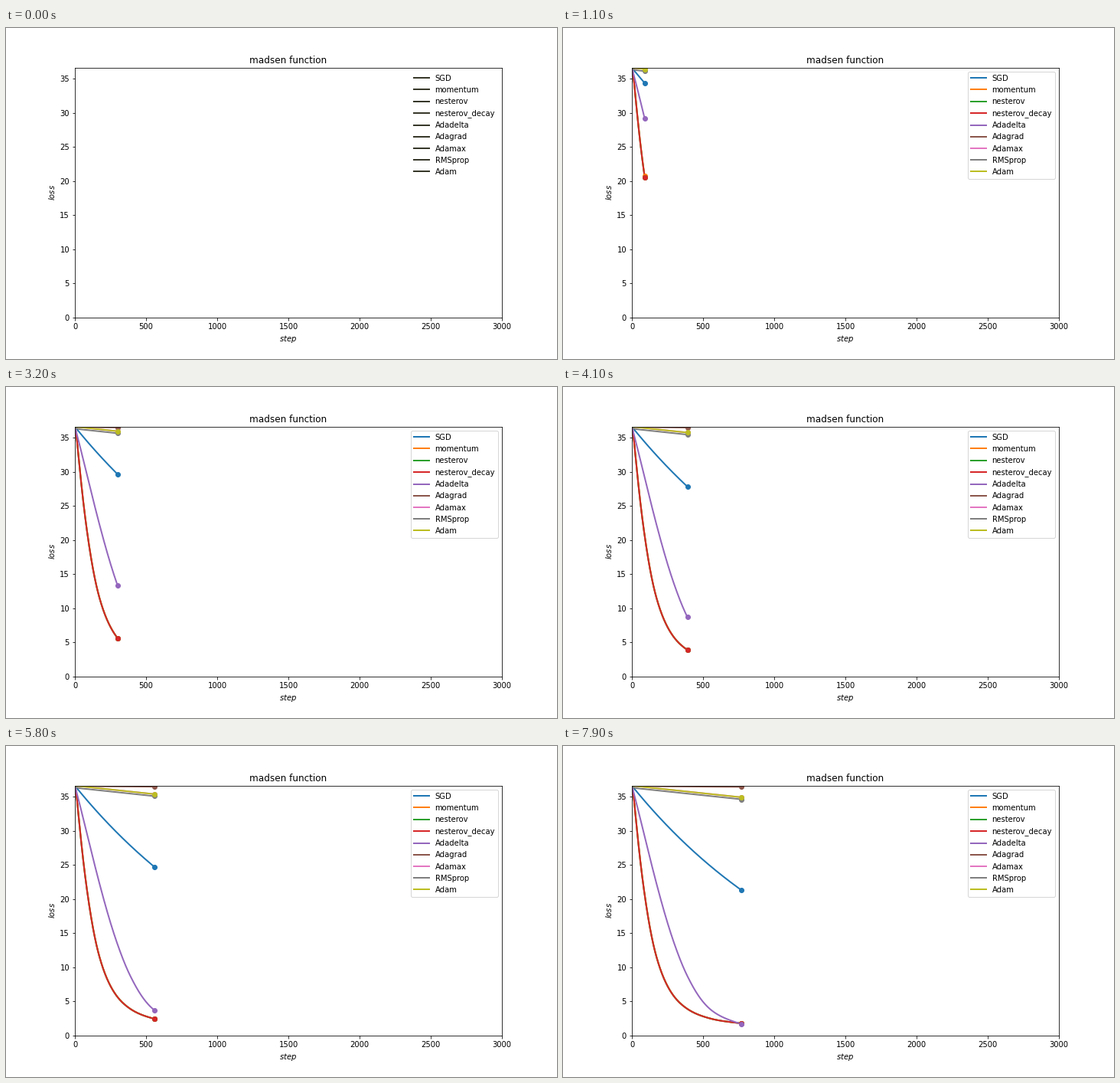
Animation, 720 px wide and 432 px high, one loop 8000 ms. Source, as a matplotlib script:

```python
import numpy as np
import matplotlib.pyplot as plt
from matplotlib.animation import FuncAnimation

FRAMES, INTERVAL = 80, 100
STEPS_PER_FRAME, DELAY = 10, 2
START = 36.6
LAST_STEP = STEPS_PER_FRAME * (FRAMES - 1 - DELAY)

plt.rcParams.update({
    "font.family": "DejaVu Sans",
    "font.size": 10,
    "lines.linewidth": 2,
    "figure.subplot.bottom": 0.125,
})


def smooth(x, knots, values):
    """Cubic Hermite curve through the knots, on a log scale."""
    knots, values = np.array(knots), np.log(values)
    slopes = np.gradient(values, knots)
    i = np.clip(np.searchsorted(knots, x, side="right") - 1, 0, len(knots) - 2)
    h = knots[i + 1] - knots[i]
    t = (x - knots[i]) / h
    return np.exp((1 + 2 * t) * (1 - t) ** 2 * values[i]
                  + t * (1 - t) ** 2 * h * slopes[i]
                  + t ** 2 * (3 - 2 * t) * values[i + 1]
                  + t ** 2 * (t - 1) * h * slopes[i + 1])


def descent(s):
    """Loss along the steepest path after s unit moves."""
    return smooth(s, [0, 77, 161, 291, 381, 551, 761],
                  [START, 21.3, 11.8, 5.66, 3.92, 2.46, 1.79])


def momentum(t, lag):
    """Momentum 0.9 reaches full speed after a short lag."""
    return descent(t - lag * (1 - 0.9 ** t))


steps = np.arange(LAST_STEP + 1)
adam = START - 0.0022 * steps
curves = {
    "SGD": descent(steps / 10),
    "momentum": momentum(steps, 9),
    "nesterov": momentum(steps, 8.1),
    "nesterov_decay": momentum(steps, 8.1),
    "Adadelta": smooth(steps, [0, 30, 170, 300, 390, 560, 770],
                       [START, 34.2, 22.5, 13.35, 8.72, 3.7, 1.7]),
    "Adagrad": START - 0.006 * np.sqrt(steps),
    "Adamax": adam,
    "RMSprop": adam - 0.3 * (1 - np.exp(-steps / 10)),
    "Adam": adam,
}

fig, ax = plt.subplots(figsize=(10, 6), dpi=72)
ax.set(xlim=(0, 3000), ylim=(0, START), title="madsen function",
       xlabel="$step$", ylabel="$loss$")

colors = [f"C{i}" for i in range(len(curves))]
lines = [ax.plot([], [], color=c, label=name)[0]
         for c, name in zip(colors, curves)]
dots = [ax.plot([], [], "o", color=c)[0] for c in colors]
legend = ax.legend(loc="upper right", labelspacing=0.515)


def style_legend(active):
    legend.get_frame().set_visible(active)
    for handle, color in zip(legend.get_lines(), colors):
        handle.set_color(color if active else "#38382a")


def update(frame):
    style_legend(frame > 0)
    last = STEPS_PER_FRAME * (frame - DELAY)
    for line, dot, loss in zip(lines, dots, curves.values()):
        if last < 0:
            line.set_data([], [])
            dot.set_data([], [])
        else:
            line.set_data(steps[:last + 1], loss[:last + 1])
            dot.set_data([last], [loss[last]])
    return lines + dots


anim = FuncAnimation(fig, update, frames=FRAMES, interval=INTERVAL,
                     repeat=True, repeat_delay=0, blit=False)
plt.show()
```
